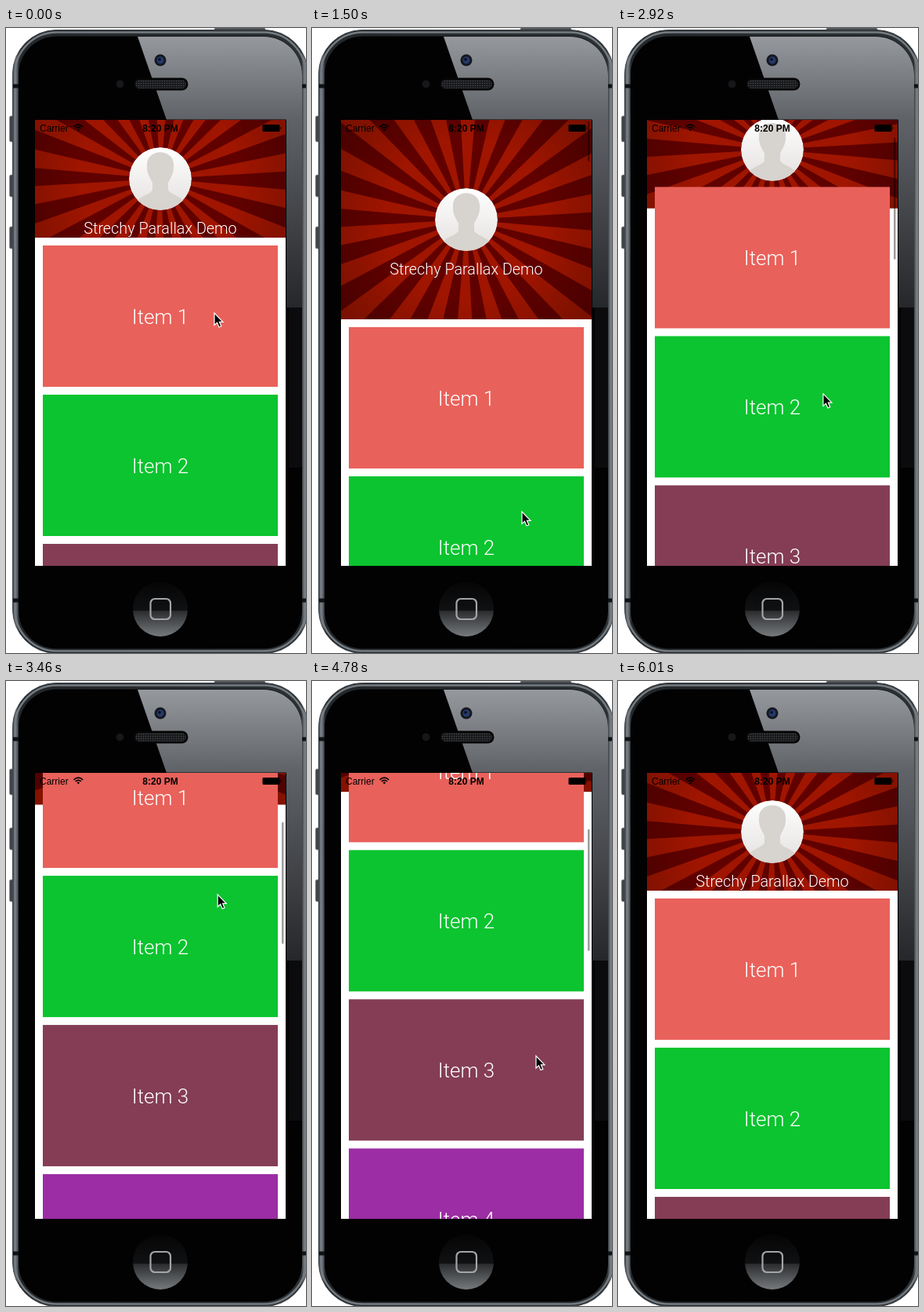
An HTML page for the animation above (6.4 s loop, 383 px wide and 796 px high).

```html
<!DOCTYPE html>
<html lang="en">
<head>
<meta charset="utf-8">
<title>Stretchy header</title>
<style>
  html, body { margin: 0; width: 100%; height: 100%; overflow: hidden; background: #fff; }
  svg { display: block; width: 383px; height: 796px; }
  .light { font-family: Roboto, sans-serif; font-weight: 300; fill: #fff; text-anchor: middle; }
  .status { font: 12px "Liberation Sans", Arial, sans-serif; }
</style>
</head>
<body>
<svg viewBox="0 0 383 796">
  <defs>
    <clipPath id="screen"><rect x="37" y="117" width="320" height="568"/></clipPath>
    <clipPath id="face"><circle r="40"/></clipPath>
    <linearGradient id="metal" x2="1" y2="0">
      <stop stop-color="#34393d"/><stop offset=".01" stop-color="#7b8288"/>
      <stop offset=".022" stop-color="#23272a"/><stop offset=".978" stop-color="#2b3033"/>
      <stop offset=".99" stop-color="#888e94"/><stop offset="1" stop-color="#3c4145"/>
    </linearGradient>
    <linearGradient id="gloss" gradientUnits="userSpaceOnUse" x1="0" y1="10" x2="0" y2="356">
      <stop stop-color="#96999e"/><stop offset=".3" stop-color="#606368"/><stop offset="1" stop-color="#26272a"/>
    </linearGradient>
    <linearGradient id="home" x2="0" y2="1">
      <stop stop-color="#050506"/><stop offset=".52" stop-color="#101112"/>
      <stop offset=".54" stop-color="#2b2d2f"/><stop offset="1" stop-color="#777a7d"/>
    </linearGradient>
    <linearGradient id="portrait" x2="0" y2="1">
      <stop stop-color="#fff"/><stop offset="1" stop-color="#e3e1de"/>
    </linearGradient>
    <radialGradient id="shade" gradientUnits="userSpaceOnUse" cx="0" cy="0" r="200">
      <stop offset=".5" stop-opacity="0"/><stop offset="1" stop-opacity=".25"/>
    </radialGradient>
    <pattern id="mesh" width="3" height="3" patternUnits="userSpaceOnUse">
      <rect width="3" height="3" fill="#18191b"/><circle cx="1.5" cy="1.5" r=".8" fill="#45484c"/>
    </pattern>
  </defs>

  <!-- Phone body -->
  <g fill="#3f4549" stroke="#8c9195" stroke-width=".8">
    <rect x="4.5" y="112" width="8" height="33" rx="2"/>
    <rect x="4.5" y="187" width="8" height="28" rx="2"/>
    <rect x="4.5" y="253" width="8" height="28" rx="2"/>
    <rect x="266" y="0" width="65" height="7" rx="1.5"/>
  </g>
  <rect x="8.500" y="2.500" width="377" height="794" rx="56" fill="url(#metal)" stroke="#454a4e"/>
  <rect x="11.500" y="5.500" width="371" height="788" rx="53" fill="none" stroke="#747b81" stroke-width="2.500"/>
  <path d="M9 74H16M9 729H16M378 74H383M378 729H383" stroke="#101214" stroke-width="5"/>
  <rect x="16" y="10.500" width="362" height="780" rx="49" fill="#020203"/>
  <path d="M168 11H329A49 49 0 0 1 378 60V356H358V117H205Z" fill="url(#gloss)"/>
  <rect x="361" y="356" width="17" height="204" fill="#0b0b0d"/>
  <circle cx="197" cy="41" r="7.5" fill="#15181f"/>
  <circle cx="197" cy="41" r="4.5" fill="#25396a"/>
  <circle cx="196" cy="40" r="1.8" fill="#090d1c"/>
  <circle cx="145.5" cy="71.5" r="5" fill="#17171a"/>
  <rect x="162" y="63.5" width="70.5" height="16" rx="8" fill="#050506"/>
  <rect x="165" y="66" width="65" height="11" rx="5.5" fill="url(#mesh)"/>
  <circle cx="197" cy="740" r="35" fill="url(#home)"/>
  <rect x="184.5" y="727" width="25.5" height="26" rx="5.5" fill="none" stroke="#a3a5a7" stroke-width="2.2"/>
  <rect x="36.5" y="116.5" width="321" height="569"/>

  <g clip-path="url(#screen)">
    <g id="burst">
      <rect x="-160" y="-160" width="320" height="320" fill="#600100"/>
      <path id="rays" fill="#a01500"/>
      <rect x="-160" y="-160" width="320" height="320" fill="url(#shade)"/>
    </g>
    <rect id="page" x="37" width="320" height="700" fill="#fff"/>
    <g id="profile">
      <g clip-path="url(#face)">
        <circle r="40" fill="url(#portrait)"/>
        <path d="M-17 -18C-17 -39 17 -39 17 -18C18 -9 14 -2 10 5V14C13 22 32 20 36 42H-36C-32 20 -13 22 -10 14V5C-14 -2 -18 -9 -17 -18Z" fill="#d7d3ce"/>
      </g>
      <text class="light" y="70" font-size="19.8">Strechy Parallax Demo</text>
    </g>
    <g id="cards"></g>
    <rect id="bar" x="352" width="2.5" rx="1.25" fill-opacity=".38"/>
    <g class="status">
      <text x="43" y="131.5">Carrier</text>
      <text x="197" y="131.5" text-anchor="middle" font-weight="bold">8:20 PM</text>
      <path d="M86.5 125.800Q92.3 120.500 98.1 125.800M88.600 128Q92.3 124.600 96 128" fill="none" stroke="#000" stroke-width="1.6"/>
      <path d="M92.3 131.500L90.500 129.300Q92.3 127.900 94.100 129.300Z"/>
      <rect x="327.5" y="123" width="22" height="9" rx="1.5"/>
      <path d="M350.500 125.500Q352.500 127.500 350.500 129.500Z"/>
    </g>
  </g>
  <path id="pointer" d="M0 0V15.500L3.500 12.300L6 18L8.800 16.800L6.400 11.300H11Z" stroke="#fff" stroke-width="1.2"/>
</svg>
<script>
const LOOP = 6400;
const START = 630;
const STEP = 88.2;
const LEAD = 22; // a pose appears slightly before the moment it shows
const COLORS = ["#e9615b", "#0bc42f", "#843d55", "#9c2da4", "#5b45f2"];
const $ = id => document.getElementById(id);

const ramp = (time, from, to) => Math.min(1, Math.max(0, (time - from) / (to - from)));
const ease = (time, from, to) => {
  const u = ramp(time, from, to);
  return u * u * (3 - 2 * u);
};

// Negative offsets stretch the header
function scrollAt(time) {
  const pull = 104 * (ease(time, 630, 1170) - ease(time, 1700, 2134));
  const travel = 412 * (ramp(time, 2650, 4160) - ease(time, 4340, 5363));
  const bounce = 20 * Math.sin(Math.PI * ramp(time, 5320, 5750));
  return travel - pull - bounce;
}

function pointerAt(time) {
  const down = ease(time, 630, 1150);
  const up = ease(time, 2440, 3500);
  const back = ease(time, 4340, 5175);
  const leave = ease(time, 5750, 5930);
  return {
    x: 266 + 2 * down - 14 * up + 32 * ease(time, 2920, 3980),
    y: 363 + 253 * down - 346 * up + 390 * back + 83 * leave
  };
}

function move(id, x, y) {
  $(id).setAttribute("transform", `translate(${x} ${y})`);
}

function rayPath(count, radius) {
  const turn = 2 * Math.PI / count;
  const point = angle => `${radius * Math.cos(angle)} ${radius * Math.sin(angle)}`;
  return Array.from({ length: count }, (_, i) =>
    `M0 0L${point((i + .3) * turn)}L${point((i + .8) * turn)}Z`).join("");
}

$("rays").setAttribute("d", rayPath(22, 260));
$("cards").innerHTML = COLORS.map((color, i) => `
  <rect x="47" y="${277 + i * 190}" width="300" height="180" fill="${color}"/>
  <text class="light" x="197" y="${377 + i * 190}" font-size="26">Item ${i + 1}</text>`).join("");

function draw(now) {
  const tick = Math.floor((now % LOOP - START + LEAD) / STEP);
  const time = tick < 0 ? 0 : START + tick * STEP;
  const scroll = scrollAt(time);
  const center = 192 - scroll / 2;
  const pointer = pointerAt(time);

  move("burst", 197, center);
  move("profile", 197, center);
  move("cards", 0, -scroll);
  move("pointer", pointer.x, pointer.y);
  $("pointer").style.display = time < 6000 ? "" : "none";
  $("page").setAttribute("y", 267 - (scroll < 0 ? scroll : scroll / 2));
  $("bar").setAttribute("y", 119 + Math.max(0, scroll) * .277);
  $("bar").setAttribute("height", 155 + Math.min(0, scroll));
  $("bar").style.opacity = ramp(time, 630, 720) - ramp(time, 5750, 6000);
}

function loop() {
  draw(performance.now());
  requestAnimationFrame(loop);
}
loop();
</script>
</body>
</html>
```
